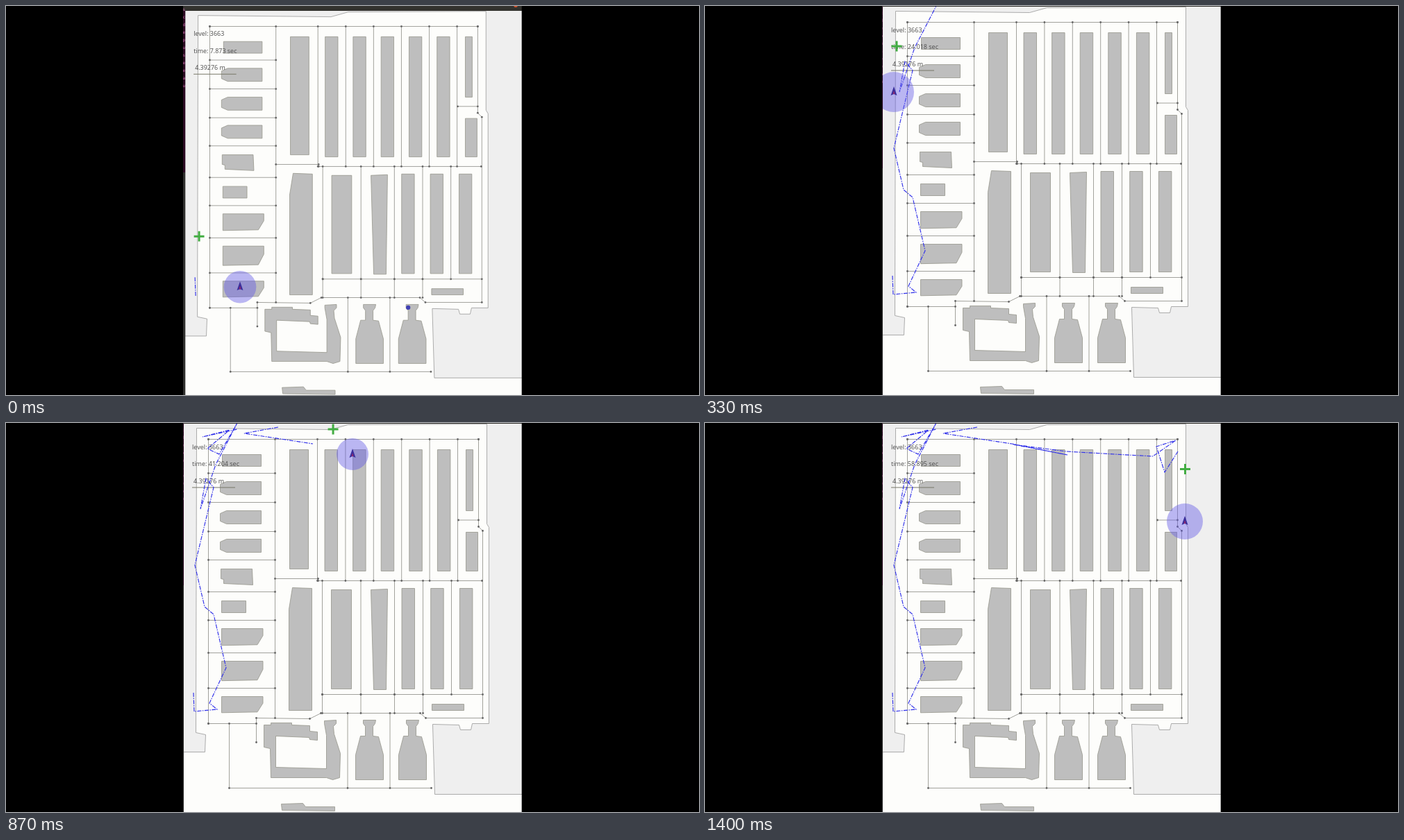
Animation of 998 by 561 pixels, one loop 1430 ms. Source, as an HTML page:

```html
<!DOCTYPE html>
<html lang="en">
<head>
<meta charset="utf-8">
<title>Robot localisation</title>
<style>
html, body { margin: 0; height: 100%; overflow: hidden; background: #000; }
svg { display: block; width: 100vw; height: 100vh; }
text { font: 9px "Noto Sans", "Open Sans", sans-serif; fill: #555; }
#walls { fill: #efefef; stroke: #999; stroke-width: .8; }
#roads { fill: none; stroke: #8b8b84; stroke-width: .8; marker: url(#node); }
#blocks { fill: #bebebe; stroke: #96968c; stroke-width: .8; }
#trail { fill: none; stroke: #3030ea; stroke-width: 1.15; stroke-dasharray: 6 1.5 1.5 1.5; }
#chrome text { font: 6px "DejaVu Sans Mono", monospace; fill: #d070b0; }
</style>
</head>
<body>
<svg viewBox="0 0 998 561" preserveAspectRatio="none">
  <marker id="node" viewBox="-2 -2 4 4" markerWidth="4" markerHeight="4" markerUnits="userSpaceOnUse">
    <circle r="1.4" fill="#666"/>
  </marker>
  <g id="view">
    <rect x="240" y="-10" width="520" height="600" fill="#fdfdfb"/>
    <g transform="translate(.5 .5)">
      <path id="walls" d="M240-10H760V535H617L614 434 652 435 654 442H669L671 433H695V150L692 145V1L492 2 467 9 274 7 273 446 287 449 286 474H240Z"/>
      <path id="roads"/>
      <path id="blocks"/>
    </g>
    <text x="268" y="37.5">level: 3663</text>
    <text x="268" y="62" id="clock"></text>
    <text x="270" y="87">4.39276 m</text>
    <path d="M268 93H330" stroke="#777768"/>
    <path id="trail"/>
    <circle id="dot" r="3.2" fill="#4040b4"/>
    <path id="cross" d="M-7.5 0H7.5M0-7.5V7.5" stroke="#43ad43" stroke-width="3"/>
    <g id="robot">
      <circle fill="#6259e6" fill-opacity=".43"/>
      <path d="M0-8L-4.5 5 0 3 4.5 5Z" fill="#3b2f9c"/>
      <path d="M0-2L-1.5 3H1.5Z" fill="#92286c"/>
    </g>
  </g>
  <g id="chrome">
    <path d="M250-1H750V7H250Z" fill="#33322e"/>
    <path d="M250 7H258.3V240H250Z" fill="#2b0a22"/>
    <path d="M250 240H258.3V570H250Z" fill="#30302e"/>
    <circle cx="734" cy="-1" r="3" fill="#d8552f"/>
  </g>
  <path d="M0 0H255V561H0ZM742.7 0H998V561H742.7Z"/>
</svg>
<script>
const $ = id => document.getElementById(id);
const clamp = (v, lo, hi) => Math.min(hi, Math.max(lo, v));
const vline = (x, y1, y2) => `M${x} ${y1}V${y2}`;
const hline = (y, x1, x2) => `M${x1} ${y}H${x2}`;
const box = (x, y, w, h) => `M${x} ${y}h${w}v${h}h${-w}Z`;
const times = (n, make) => Array.from({ length: n }, (_, i) => make(i)).join('');

// Roads; a marker dots every junction
const rows = [72, 114, 156, 197, 243, 284, 331, 382];
const lower = [455, 510.5, 559, 600];
$('roads').setAttribute('d', [
  vline(291, 23, 433), vline(387, 23, 425), hline(23, 291, 680),
  ...rows.map(y => hline(y, 291, 387)),
  times(6, i => vline(448 + i * 40.4, 23, 227)),
  ...lower.map(x => vline(x, 227, 391) + vline(x, 391, 418)),
  vline(641, 227, 391), hline(224, 387, 449), hline(227, 449, 685),
  hline(139.5, 651, 680), hline(391, 455, 686),
  'M680 23V149L686 155V425H604L596 418H453L437 426 360 425V460',
  'M291 433H360M321 433V526H612', vline(491.5, 418, 526), vline(552.5, 418, 526)
].join(''));

// Buildings
const barn = y => `M308 ${y + 4}l9-4h50v19h-50l-9-4Z`;
const house = (y, h) => `M310 ${y}h59.5v${h * .42}l-8 ${h * .55}-51.5 1Z`;
const bottle = x => `M${x} 428h18l-1 5-3 4v14l8 1 7 26v36h-40v-36l7-27h7v-14l-3-4Z`;
$('blocks').setAttribute('d', [
  box(311, 45, 56, 17), ...[84, 126, 167].map(barn),
  'M309 210h45l1 23-42-2v-6l-4-1Z', box(310, 256, 35, 17),
  house(296, 24), house(343, 28), house(394, 23),
  box(408, 38, 27, 172), times(5, i => box(458.5 + i * 40.6, 38, 18.5, 175)),
  box(662, 38, 10, 88), box(662, 157, 17, 56),
  'M412 237l28 1v176h-33v-146Z', box(468, 240, 29, 143),
  'M525 240l24-1-2 145h-18Z',
  times(3, i => box(569.5 + i * 41.7, 238, 18.5, 145)), box(613, 405, 46, 9),
  'M371 435H381V432H411V435L437 436V444L448 445V457L437 456 436 453 388 451V496L461 498V450L458 433V429L475 428V433L471 437 472 448 481 476 480 511 470 514 461 511H381L380 469 371 467Z',
  bottle(514), bottle(576),
  'M396 549l31-1 4 5h42v6l-76-1Z'
].join(''));

[...'scdepuseeau'].forEach((ch, i) => {
  const glyph = $('chrome').appendChild(document.createElementNS('http://www.w3.org/2000/svg', 'text'));
  glyph.setAttribute('x', 254.6);
  glyph.setAttribute('y', 7 + i * 11);
  glyph.textContent = ch;
});

// Estimated pose: [video step, clock, x, y, uncertainty]
const poses = [
  [0, 7.873, 335.4, 403, 23.5], [2, 11.122, 335, 301, 20.5],
  [10, 24.018, 272, 124, 29], [20, 35.204, 395, 7, 27],
  [26, 41.204, 499, 45, 23], [34, 50.739, 622, 45, 20], [42, 58.895, 691, 142, 26]
];
const route = ('M270 389L271 416L304 413L293 404L317 353L299 276L286 265L272 205L299 93L288 80' +
  'L280 124L302 60L333 0L307 45L290 37L322 10L283 20L333 9M392 6L343 15L442 30' +
  'L522 46L444 31L520 41L590 45L645 48L678 25L650 34L662 71L681 41').match(/[ML][^ML]+/g);

function poseAt(step) {
  const i = Math.max(1, poses.findIndex(pose => pose[0] >= step));
  const [a, b] = [poses[i - 1], poses[i]];
  const u = (step - a[0]) / (b[0] - a[0]);
  return a.slice(1).map((v, j) => v + (b[j + 1] - v) * u);
}
const place = (id, x, y) => $(id).setAttribute('transform', `translate(${x} ${y})`);

function draw(ms) {
  // 30 steps per second, on a 10 ms clock
  const step = Math.floor((Math.floor(ms / 10) * 10 + 3.4) * 0.03);
  const shrink = Math.max(0, 1 - step / 2);
  $('view').setAttribute('transform',
    `matrix(${1 - .008 * shrink} 0 0 ${1 - .01 * shrink} ${4.3 * shrink} ${6.2 * shrink})`);
  place('chrome', -2.3 * (1 - shrink), -6 * (1 - shrink));

  const [clock, x, y, radius] = poseAt(step);
  $('clock').textContent = `time: ${clock.toFixed(3)} sec`;
  place('robot', x, y);
  $('robot').firstElementChild.setAttribute('r', radius);

  // True position: up the left side, along the top, down the right side
  place('cross', clamp(16 * clock - 188.2, 276, 691.5),
    Math.max(9, 461.5 - 16.8 * clock, 15 * clock - 817));

  place('dot', 579.5 - 24.5 * step, 433 - 25.5 * step);
  $('dot').style.display = step < 4 ? '' : 'none';

  const reached = Math.floor(Math.min(2.8 + 1.1 * step, 7.65 + .535 * step));
  $('trail').setAttribute('d', route.slice(0, reached).join(''));
}

const start = performance.now();
(function tick() {
  draw((performance.now() - start) % 1430);
  requestAnimationFrame(tick);
})();
</script>
</body>
</html>
```
